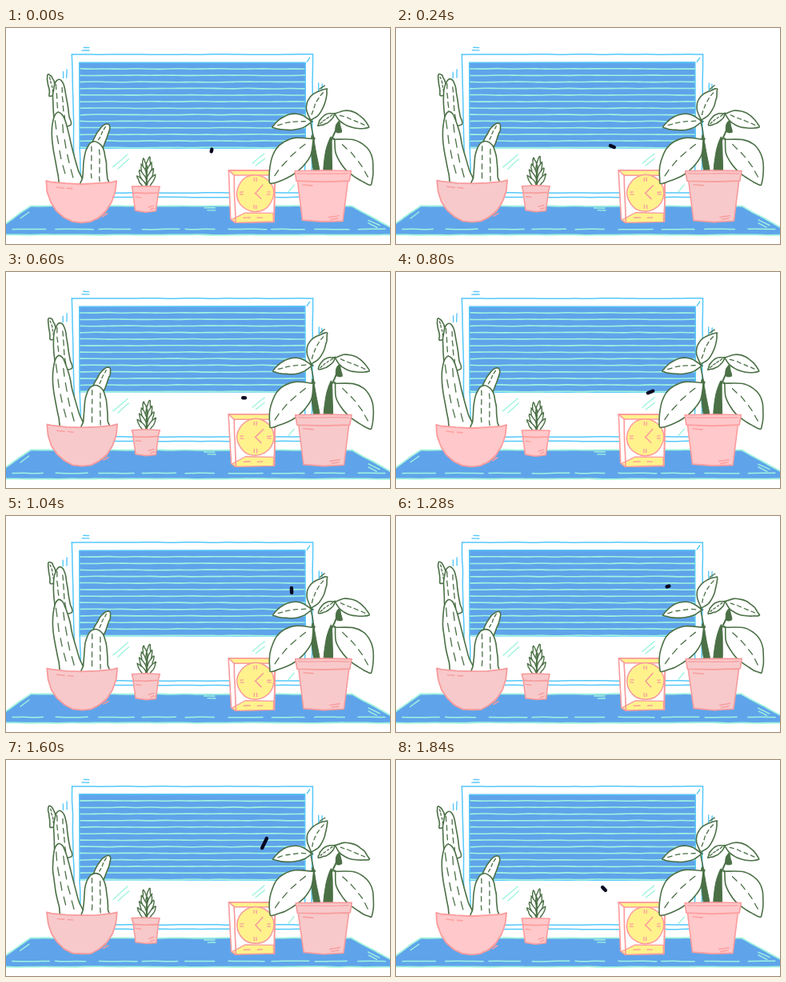
Recreate the animation shown at these times as an HTML page. Size 480 px wide and 270 px high, loop 1920 ms.

```html
<!DOCTYPE html>
<html lang="en">
<head>
<meta charset="utf-8">
<title>Window sill</title>
<style>
html, body { margin: 0; width: 100%; height: 100%; overflow: hidden; background: #fff; }
svg { display: block; width: 100vw; height: 100vh; }
path { stroke-linecap: round; stroke-linejoin: round; }
</style>
</head>
<body>
<svg id="stage" viewBox="0 0 480 270"></svg>
<script>
const SVG = 'http://www.w3.org/2000/svg';
const stage = document.getElementById('stage');
const LOOP = 1920, FLY_STEP = 80, REDRAW_STEP = 120;
const BLUE = '#5fa4ea', MINT = '#a0f3df', SKY = '#55c8fa', GREEN = '#4b7046', YELLOW = '#fff28c', WHITE = '#fff';

function add(parent, tag, attrs = {}) {
  const node = document.createElementNS(SVG, tag);
  for (const key in attrs) node.setAttribute(key, attrs[key]);
  return parent.appendChild(node);
}

const range = (n, fn) => Array.from({ length: n }, (_, i) => fn(i));
const mix = (a, b, t) => a + (b - a) * t;

// Smooth curve through the points
function curve(points, closed) {
  const n = points.length;
  const at = i => closed ? points[(i + n) % n] : points[Math.max(0, Math.min(n - 1, i))];
  let d = `M${points[0]}`;
  for (let i = 0; i < (closed ? n : n - 1); i++) {
    const [a, b, c, e] = [at(i - 1), at(i), at(i + 1), at(i + 2)];
    const c1 = b.map((v, k) => v + (c[k] - a[k]) / 6);
    const c2 = c.map((v, k) => v - (e[k] - b[k]) / 6);
    d += `C${c1} ${c2} ${c}`;
  }
  return d + (closed ? 'Z' : '');
}

// Maps (t along, s across) to a point on a bent limb
function limb([x0, y0], [x1, y1], bend) {
  const dx = x1 - x0, dy = y1 - y0, length = Math.hypot(dx, dy);
  return (t, s) => {
    const side = s + bend * 4 * t * (1 - t);
    return [x0 + dx * t + dy / length * side, y0 + dy * t - dx / length * side];
  };
}

const leafProfile = t => Math.sin(Math.PI * t ** 0.9) ** 0.8;
const stalkProfile = t => Math.sqrt(1 - t ** 5) * (1.1 - 0.2 * t);

// One of three hand-drawn versions of the scene
function drawScene(version) {
  const group = add(stage, 'g');
  const pink = version ? '#f8c9ca' : '#ffc8ca';
  const coral = version ? '#f79b9d' : '#ff9c9d';
  let seed = version * 977 + 13, shift = [0, 0];

  const random = () => {
    seed = (seed * 16807) % 2147483647;
    return seed / 2147483647 * 2 - 1;
  };
  const jitter = points => points.map(p =>
    p.map((v, k) => +(v + random() * 0.35 + (version ? shift[k] : 0)).toFixed(2)));
  const put = (d, stroke, fill, width = 1.6) =>
    add(group, 'path', { d, stroke, fill, 'stroke-width': width });
  const blob = (points, stroke, fill, width) => put(curve(jitter(points), true), stroke, fill, width);
  const poly = (points, stroke, fill, width) =>
    put('M' + jitter(points).join('L') + 'Z', stroke, fill, width);

  // Long stroke with a slight tremble
  function rough(x1, y1, x2, y2, color, width = 1.5) {
    const n = Math.ceil(Math.hypot(x2 - x1, y2 - y1) / 18);
    const points = range(n + 1, i => [mix(x1, x2, i / n), mix(y1, y2, i / n)]);
    put(curve(jitter(points)), color, 'none', width);
  }

  // Parallel short strokes, each a little shorter than the last
  function hatch(x, y, dx, dy, color, count = 2, gapX = 3, gapY = 4) {
    for (let i = 0; i < count; i++) {
      const k = 1 - i * 0.25;
      rough(x + i * gapX, y + i * gapY, x + i * gapX + dx * k, y + i * gapY + dy * k, color, 1.4);
    }
  }

  function grow(base, tip, width, bend, profile, ribs, stroke = 1.6) {
    const at = limb(base, tip, bend);
    const ts = range(9, i => 1 - (1 - i / 8) ** 1.6);
    const left = ts.map(t => at(t, -width * profile(t)));
    const right = ts.slice(0, -1).reverse().map(t => at(t, width * profile(t)));
    blob([...left, ...right], GREEN, WHITE, stroke);
    for (const rib of ribs) {
      for (let t = 0.15 + rib * 0.1; t < 0.85; t += 0.2) {
        rough(...at(t, rib * width), ...at(t + 0.11, rib * width), GREEN, 1.3);
      }
    }
  }
  const leaf = (base, tip, width, bend, ribs = [0]) => grow(base, tip, width, bend, leafProfile, ribs);
  const stalk = (base, tip, width, bend, ribs) => grow(base, tip, width, bend, stalkProfile, ribs);

  function pot(x, y, width, height, rim) {
    const a = width * 0.45, b = width * 0.36, h = width / 2;
    poly([[x - a, y + rim], [x - b, y + height - 2], [x, y + height], [x + b, y + height - 1], [x + a, y + rim]], coral, pink);
    poly([[x - h, y], [x, y - 0.5], [x + h, y], [x + h - 2, y + rim], [x, y + rim + 1], [x - h + 2, y + rim]], coral, pink);
    hatch(x + b * 0.3, y + height - 6, b * 0.5, -2, coral, 2, 2, 3);
    hatch(x - a * 0.8, y + rim + 5, a * 0.4, 1, coral, 1);
  }

  function drawWindow() {
    poly([[92, 43], [374, 43], [374, 150], [92, 150]], SKY, BLUE, 1.4);
    for (let i = 0; i < 13; i++) rough(93, 51 + i * 8.2, 373, 51 + i * 8.2, MINT, 1.6);
    rough(82.5, 33, 383.5, 33, SKY);
    rough(82.5, 33, 86, 206, SKY);
    rough(383.5, 33, 382, 206, SKY);
    rough(92, 150, 94, 205, SKY);
    rough(374, 150, 373, 205, SKY);
    rough(92, 206, 374, 206, SKY);
    rough(87, 211.5, 382, 211.5, SKY);
    hatch(95, 28, 9, 0, SKY, 2, 2, -3.5);
    hatch(76, 52, 0, 10, SKY, 2, -4.5, 3);
    hatch(391, 69, 0, 10, SKY, 2, 4, 1);
    hatch(376, 42, 4, -5, SKY, 1);
    hatch(134, 174, 18, -16, MINT, 2, 6, 2);
    hatch(308, 169, 15, -12, MINT, 2, 4, 3);
    hatch(353, 204, 7, -8, MINT, 1);
  }

  function drawDesk() {
    poly([[31, 222.5], [432, 222.5], [484, 251], [484, 258.5], [-4, 258.5], [-4, 247]], 'none', BLUE);
    rough(31, 222.5, 432, 222.5, MINT, 1.8);
    rough(31, 222.5, -4, 247, MINT, 1.8);
    rough(432, 222.5, 484, 251, MINT, 1.8);
    rough(-4, 258.5, 484, 258.5, MINT, 1.8);
    for (let x = 8; x < 470; x += 54) {
      rough(x, 251.5, Math.min(x + 42 + random() * 6, 474), 251.5, MINT);
    }
    hatch(248, 225, 13, 0, MINT, 2, 4, 3);
    hatch(453, 240, 14, 7, MINT, 2, 0, 4);
    hatch(18, 238, 11, -8, MINT, 1);
  }

  function drawCactus() {
    shift = [1, -0.6];
    stalk([59, 84], [53, 58], 4.2, -1, [0]);
    stalk([71, 122], [66, 64], 9, 1, [-0.4, 0.4]);
    stalk([83, 198], [65, 105], 12, 3, [-0.35, 0.35]);
    stalk([112, 153], [128, 120], 7, 1, [0.2]);
    stalk([111, 198], [111, 142], 14.5, 0, [-0.4, 0.3]);
    const bowl = range(13, i => {
      const a = Math.PI * i / 12;
      return [94 + 44 * Math.cos(a), Math.min(243, 191 + 53 * Math.sin(a))];
    });
    const rim = range(5, i => [mix(56, 132, i / 4), 192.5 + 2.5 * Math.sin(Math.PI * i / 4)]);
    poly([...bowl, ...rim], coral, pink, 1.8);
    hatch(116, 236, 8, -5, coral, 2, 5, 0);
    hatch(63, 199, 9, 1, coral, 2, 13, 1);
  }

  function drawSucculent() {
    shift = [0.3, -0.5];
    for (let row = 3; row >= 0; row--) {
      for (const side of [-1, 1]) {
        const tip = [175.5 + side * (11.5 - row * 2.5), 184 - row * 7.5 - side];
        grow([175.5, 200 - row * 5], tip, 2.5, 0, leafProfile, [], 1.4);
      }
    }
    rough(175.5, 199, 176.5, 172, GREEN, 1.8);
    pot(174.5, 198, 35, 32, 8);
  }

  function drawClock() {
    const cx = 311.5, cy = 206.5, radius = 23;
    shift = [0.3, 0];
    poly([[278, 178], [330, 178], [336, 184], [335, 242], [286, 243], [281, 239]], coral, WHITE);
    poly([[282, 240], [299, 231], [334, 231], [334, 242], [287, 243]], coral, YELLOW, 1.3);
    poly([[278, 178], [330, 178], [336, 184], [285, 184]], coral, YELLOW);
    blob(range(12, i => {
      const a = i * Math.PI / 6;
      return [cx + radius * Math.cos(a), cy + radius * Math.sin(a)];
    }), coral, YELLOW, 1.5);
    rough(285, 184, 287, 243, coral, 1.7);
    rough(336, 184, 335, 242, coral, 1.7);
    rough(321, 196.5, cx, cy, coral);
    rough(cx, cy, 318.5, 213.5, coral);
    for (let i = 0; i < 4; i++) {
      const ux = Math.round(Math.cos(i * Math.PI / 2)), uy = Math.round(Math.sin(i * Math.PI / 2));
      for (const side of [-1.5, 1.5]) {
        const x = cx - uy * side, y = cy + ux * side;
        rough(x + ux * 15, y + uy * 15, x + ux * 19, y + uy * 19, coral, 1.3);
      }
    }
    hatch(297, 237, 8, 0, coral, 2, 17, 0);
  }

  function drawStem(base, tip, width) {
    const at = limb(base, tip, 1);
    blob([at(0, -width), at(0.6, -width * 0.8), at(1, -1), at(1, 1), at(0.6, width * 0.8), at(0, width)], GREEN, GREEN, 1);
  }

  function drawPlant() {
    shift = [0.4, 0];
    drawStem([389, 184], [383, 136], 3.5);
    drawStem([402, 184], [406, 138], 5);
    rough(380, 114, 385, 140, GREEN);
    rough(414, 124, 406, 142, GREEN, 2);
    leaf([384, 139], [330, 194], 20, -5);
    leaf([411, 139], [456, 196], 19, 6);
    leaf([382, 117], [333, 124], 10, -3);
    leaf([411, 107], [390, 122], 5, -1);
    leaf([411, 107], [454, 124], 9.5, 1);
    leaf([381, 115], [401, 76], 10.5, 4);
    drawStem([416, 130], [416, 117], 3.5);
    hatch(392, 76, 6, -4, GREEN, 1);
    shift = [1, 0];
    pot(396, 178.5, 70, 64, 12.5);
    rough(364, 182, 428, 182, coral, 1.2);
  }

  [drawWindow, drawDesk, drawCactus, drawSucculent, drawClock, drawPlant].forEach(draw => {
    shift = [0, 0];
    draw();
  });
  return group;
}

const scenes = range(3, drawScene);
const fly = add(stage, 'path', { stroke: '#080820', 'stroke-width': 4.4, fill: 'none' });

// Key points of the flight: step, x, y
const flight = [
  [0, 257, 153], [2, 263, 146], [5, 287, 155], [8, 303, 157], [10, 318, 150],
  [11, 334, 142], [12, 354, 108], [13, 357, 93], [14, 354, 86], [16, 340, 88],
  [19, 329, 94], [20, 323, 104], [21, 308, 133], [22, 271, 165], [23, 260, 161]
];
const STEPS = LOOP / FLY_STEP;

// Cyclic key lookup; steps keep growing past the end of the loop
function keyAt(i) {
  const n = flight.length, lap = Math.floor(i / n);
  const [step, x, y] = flight[i - lap * n];
  return [step + lap * STEPS, x, y];
}

const slope = (i, axis) => {
  const a = keyAt(i - 1), b = keyAt(i + 1);
  return (b[axis] - a[axis]) / (b[0] - a[0]);
};

function flyAt(step) {
  const i = flight.findLastIndex(key => key[0] <= step);
  const a = keyAt(i), b = keyAt(i + 1), span = b[0] - a[0], t = (step - a[0]) / span;
  return [1, 2].map(k =>
    mix(a[k], b[k], t * t * (3 - 2 * t)) +
    span * t * (1 - t) * ((1 - t) * slope(i, k) - t * slope(i + 1, k)));
}

function render(time) {
  const t = time % LOOP;
  const version = Math.floor(t / REDRAW_STEP) % scenes.length;
  scenes.forEach((scene, i) => scene.setAttribute('display', i === version ? 'inline' : 'none'));

  // The body stretches along its path with speed
  const step = Math.floor(t / FLY_STEP);
  const [x, y] = flyAt(step), [nextX, nextY] = flyAt(step + 0.1);
  const dx = (nextX - x) * 2.8, dy = (nextY - y) * 2.8;
  fly.setAttribute('d', `M${x - dx},${y - dy}L${x + dx},${y + dy}`);
}

const start = performance.now();
function tick() {
  render(performance.now() - start);
  requestAnimationFrame(tick);
}
render(0);
requestAnimationFrame(tick);
</script>
</body>
</html>
```
